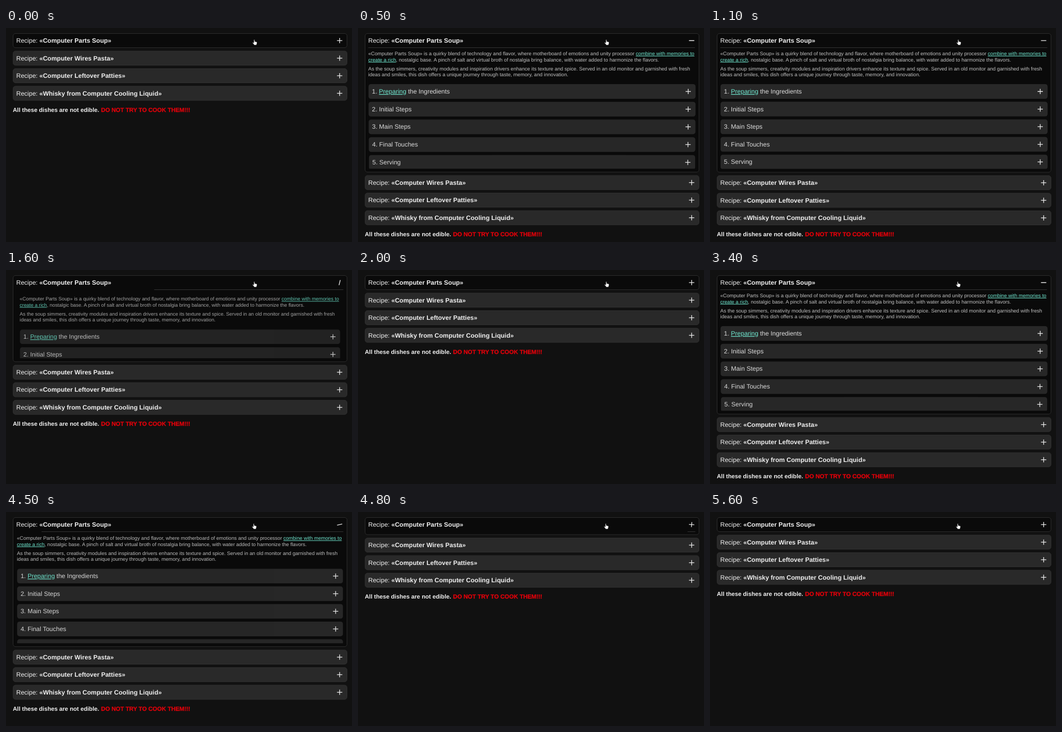
An HTML page that plays this animation: 658x408 px, repeating every 5700 ms.

```html
<!DOCTYPE html>
<html lang="en">
<head>
<meta charset="utf-8">
<title>Recipe accordion</title>
<style>
  html, body { margin: 0; width: 100%; height: 100%; overflow: hidden; background: #111; }
  svg { display: block; width: 658px; height: 408px; }
  text {
    font: 12px "Liberation Sans", Arial, sans-serif;
    fill: #f0f0f0;
    white-space: pre;
    text-rendering: geometricPrecision;
  }
  .bold, .warning { font-weight: bold; }
  .warning { font-size: 11.2px; }
  .danger { fill: #e2000a; stroke: #e2000a; stroke-width: .3; }
  .copy { font-size: 9.6px; fill: #c0c0c0; }
  .step { fill: #dcdcdc; }
  .link { fill: #70e8d0; text-decoration: underline; }
  .card { fill: #292929; stroke: #303030; }
  .open-card { fill: #0a0a0a; stroke: #2d2d2d; }
  .step-card { fill: #282828; }
  .icon { stroke: #ededed; stroke-width: 1.3; }
  .rule { stroke: #343434; }
</style>
</head>
<body>
<svg viewBox="0 0 658 408">
  <defs><clipPath id="clip"><rect id="clipBox" x="13" y="38" width="636" height="0"/></clipPath></defs>
  <rect id="panel" class="open-card" x="13.5" y="10.5" width="635" height="27" rx="4.5"/>
  <g id="header"></g>
  <line id="rule" class="rule" y1="37.5" y2="37.5"/>
  <g id="content" clip-path="url(#clip)"></g>
  <g id="below"></g>
  <path id="cursor" fill="#fff" stroke="#000" stroke-width=".7" stroke-linejoin="round"
    d="M-1.8-5q1-1 1.8 0v3l3.6.9q1 .4.9 1.5l-.6 3-.8 1.8h-4l-1.3-2-2-2.4q.2-1.4 1.4-.7l1 .8z"/>
</svg>
<script>
const LOOP = 5700, STEP = 100, DURATION = 420;
const PANEL_GROWTH = 237.5, PITCH = 33.5, STEP_PITCH = 33.6;
const cycles = [{ open: 100, close: 1492.5 }, { open: 3000, close: 4463 }];

const $ = id => document.getElementById(id);
const clamp = v => Math.min(1, Math.max(0, v));

const link = s => `<tspan class="link">${s}</tspan>`;
const text = (x, y, cls, s) => `<text x="${x}" y="${y}" class="${cls}">${s}</text>`;
const plus = (x, y) => `<g class="icon" transform="translate(${x} ${y})">
  <line x1="-5" x2="5"/><line class="upright" y1="-5" y2="5"/></g>`;
const title = (y, name) => text(19.5, y + 4, '', `Recipe: <tspan class="bold">«${name}»</tspan>`) + plus(634.5, y);

$('header').innerHTML = title(24, 'Computer Parts Soup');
$('below').innerHTML =
  ['Computer Wires Pasta', 'Computer Leftover Patties', 'Whisky from Computer Cooling Liquid'].map((name, i) => {
    const y = 57.5 + i * PITCH;
    return `<rect class="card" x="13.5" y="${y - 13.5}" width="635" height="27" rx="4.5"/>` + title(y, name);
  }).join('') +
  text(13, 159.7, 'warning', 'All these dishes are not edible. <tspan class="danger" dx=".6">DO NOT TRY TO COOK THEM!!!</tspan>');

const paragraph = (y, ...lines) => ({
  y: y + 2, delay: 0,
  markup: lines.map((s, i) => text(19.5, y + i * 11.7, 'copy', s)).join('')
});
const steps = [`${link('Preparing')} the Ingredients`, 'Initial Steps', 'Main Steps', 'Final Touches', 'Serving'];
const children = [
  paragraph(52,
    `«Computer Parts Soup» is a quirky blend of technology and flavor, where motherboard of emotions and unity processor ${link('combine with memories to')}`,
    `${link('create a rich')}, nostalgic base. A pinch of salt and virtual broth of nostalgia bring balance, with water added to harmonize the flavors.`),
  paragraph(80.5,
    'As the soup simmers, creativity modules and inspiration drivers enhance its texture and spice. Served in an old monitor and garnished with fresh',
    'ideas and smiles, this dish offers a unique journey through taste, memory, and innovation.'),
  ...steps.map((name, i) => {
    const y = 121 + i * STEP_PITCH;
    return {
      y, delay: i * 25,
      markup: `<rect class="step-card" x="20" y="${y - 14}" width="622" height="28" rx="4.5"/>` +
        text(26.5, y + 4, 'step', `${i + 1}. ${name}`) + plus(628, y)
    };
  })
];
$('content').innerHTML = children.map(c => `<g>${c.markup}</g>`).join('');
children.forEach((c, i) => c.node = $('content').children[i]);

const icon = $('header').querySelector('.icon');
const upright = icon.querySelector('.upright');

// cubic-bezier(.25, .1, .25, 1), solved by bisection
function ease(x) {
  if (x <= 0 || x >= 1) return clamp(x);
  const bezier = (s, a, b) => 3 * s * (1 - s) ** 2 * a + 3 * s * s * (1 - s) * b + s ** 3;
  let lo = 0, hi = 1;
  for (let i = 0; i < 24; i++) {
    const mid = (lo + hi) / 2;
    if (bezier(mid, .25, .25) < x) lo = mid; else hi = mid;
  }
  return bezier(lo, .1, 1);
}

const currentCycle = t => cycles.filter(c => t >= c.open).pop();

function openness(t, delay = 0) {
  const cycle = currentCycle(t);
  if (!cycle) return 0;
  return t >= cycle.close
    ? 1 - ease((t - cycle.close) / DURATION)
    : ease((t - cycle.open - delay) / DURATION);
}

function render(t) {
  const open = openness(t), growth = PANEL_GROWTH * open;
  const cycle = currentCycle(t);
  const closing = cycle && t >= cycle.close;

  $('panel').setAttribute('height', 27 + growth);
  $('clipBox').setAttribute('height', Math.max(0, growth - 7));
  $('below').setAttribute('transform', `translate(0 ${growth})`);

  // The rule grows from the left and retracts to the right.
  $('rule').setAttribute('x1', closing ? 641.5 - 622 * open : 19.5);
  $('rule').setAttribute('x2', closing ? 641.5 : 19.5 + 622 * open);

  icon.setAttribute('transform', `translate(634.5 24) rotate(${180 * open})`);
  upright.setAttribute('transform', `scale(1 ${clamp(1 - 2 * open)})`);
  upright.setAttribute('visibility', open < .5 ? 'visible' : 'hidden');

  for (const { node, y, delay } of children) {
    const shown = openness(t, delay), scale = .95 + .05 * shown;
    node.setAttribute('opacity', .6 + .4 * shown);
    node.setAttribute('transform',
      `translate(331 ${y + 15 * (1 - shown)}) scale(${scale}) translate(-331 ${-y})`);
  }
  $('cursor').setAttribute('transform', `translate(${t < 2500 ? 473 : 472} 27.5)`);
}

const start = performance.now();
function frame() {
  const t = (performance.now() - start) % LOOP;
  render(Math.floor(t / STEP) * STEP);
  requestAnimationFrame(frame);
}
frame();
</script>
</body>
</html>
```
